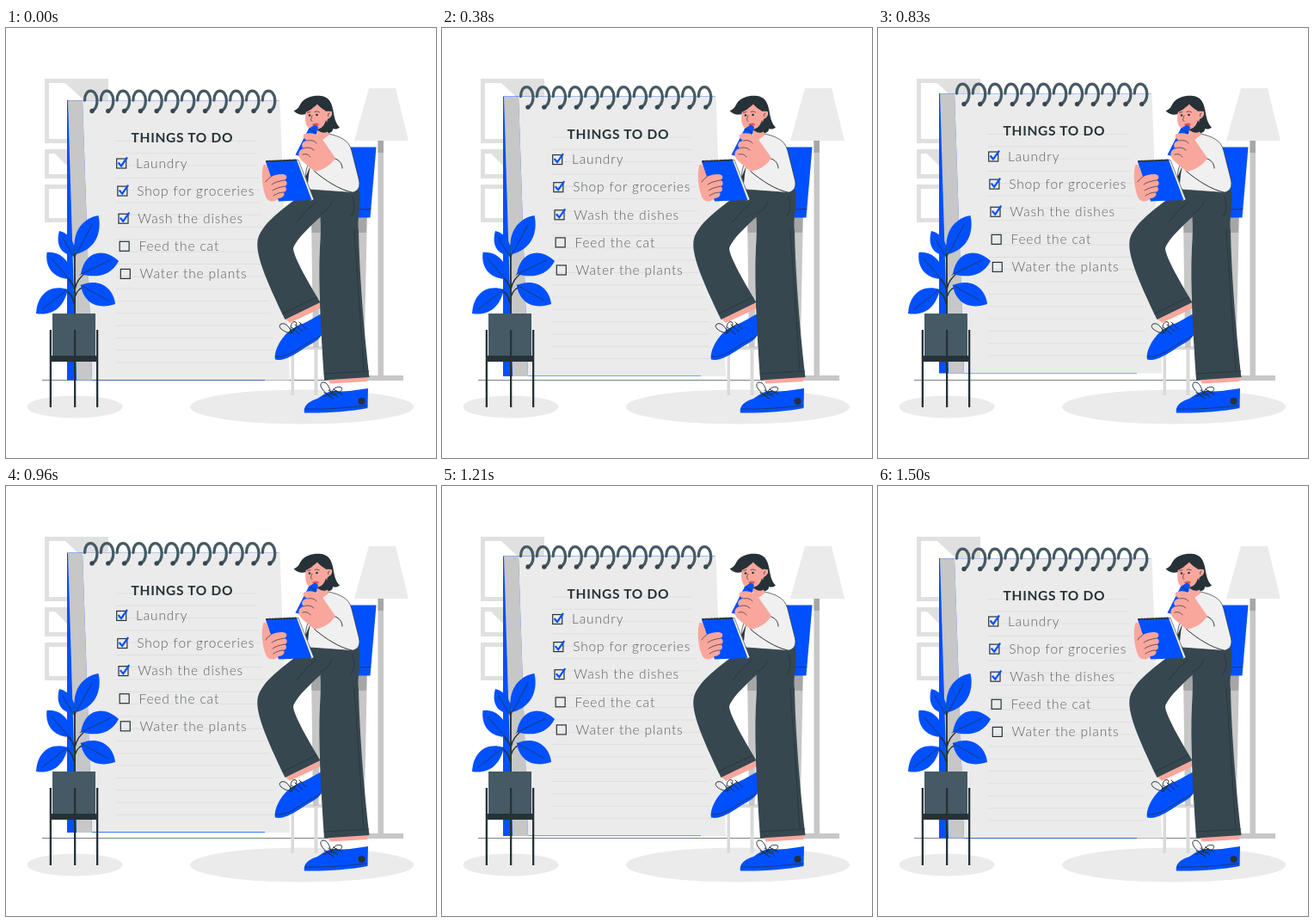
Write an HTML page that moves like this. It is 500 px wide and 500 px high and loops after 1.54 s.

```html
<!DOCTYPE html>
<html lang="en">
<head>
<meta charset="utf-8">
<title>Things to do</title>
<style>
  html, body { margin: 0; width: 100%; height: 100%; overflow: hidden; background: #fff; }
  svg { display: block; width: 100%; height: 100%; }
  .blue { fill: #0050ff; }
  .dark { fill: #263238; }
  .pants { fill: #37474f; }
  .skin { fill: #f9a79d; }
  .ink { fill: none; stroke: #263238; stroke-width: 1; stroke-linecap: round; stroke-linejoin: round; }
  .thin { stroke-width: .7; }
  .stem { stroke-width: 1.5; }
  .pale { fill: #e0e0e0; }
  .grey { fill: #c7c7c7; }
  .deep { fill: #a6a6a6; }
  .shade { fill: #ebebeb; }
  .floor { stroke: #6b7378; stroke-width: .9; }
  .rule { stroke: #dcdcdc; stroke-width: .8; }
  .ring { fill: none; stroke: #455a64; stroke-width: 3.3; stroke-linecap: round; }
  .box { fill: none; stroke: #263238; stroke-width: 1.2; }
  .tick { fill: none; stroke: #0050ff; stroke-width: 2.2; }
  text { font-family: Lato, "Open Sans", sans-serif; font-size: 15.5px; }
  .title { font-weight: 700; letter-spacing: .7px; fill: #263238; }
  .item { font-weight: 300; letter-spacing: .87px; fill: #5c6064; }
  #pad { animation: bob 1540ms cubic-bezier(.37, 0, .63, 1) infinite; }
  @keyframes bob {
    0% { transform: translateY(0); }
    47.5% { transform: translateY(-8.3px); }
    97%, 100% { transform: translateY(0); }
  }
</style>
</head>
<body>
<svg viewBox="0 0 500 500">
  <!-- wall frames -->
  <g class="pale">
    <path fill-rule="evenodd" d="M45 59H119V134H45ZM50 64V129H114V64Z"/>
    <path d="M69 64H114V106Z"/>
    <path fill-rule="evenodd" d="M45 141H119V175H45ZM50 146V170H114V146Z"/>
    <path d="M57 146H114V170H81Z"/>
    <path fill-rule="evenodd" d="M45 182H119V226H45ZM50 187V221H114V187Z"/>
  </g>

  <!-- floor and lamp -->
  <ellipse class="shade" cx="80" cy="440.500" rx="55.500" ry="13"/>
  <ellipse class="shade" cx="344" cy="440.500" rx="130" ry="20"/>
  <path class="floor" d="M42 409.500H440"/>
  <path class="grey" d="M432.500 131H439V404H462V410H394V404H432.500Z"/>
  <path class="deep" d="M432.500 131H439V145H432.500Z"/>
  <path class="shade" d="M422 70H453L468 131H405Z"/>

  <g id="pad">
    <path class="blue" d="M71 84H318L301 409.500H71Z"/>
    <path class="grey" d="M72 84.300H89L100 409.500H82Z"/>
    <path class="shade" d="M89 84.200H318.500L330 409.500H301V408.900H100Z"/>
    <g id="rules"></g>
    <g id="rings"></g>
    <text class="title" x="145.500" y="133.300">THINGS TO DO</text>
    <g id="items"></g>
  </g>

  <!-- stool -->
  <g>
    <path fill="#d9d9d9" d="M331.500 370H367V374H335V427H331.500Z"/>
    <path class="grey" d="M355 215H366L363.500 372H357Z"/>
    <path fill="#d9d9d9" d="M358.500 372H362.500V427H358.500Z"/>
    <path class="grey" d="M409 215H420L416 406H411Z"/>
    <path class="deep" d="M355 220H365.500V238H355.500ZM409 220H419.500L419 238H409Z"/>
    <path class="blue" d="M390 138.500H430.500L423.500 220.500H400Z"/>
    <path class="ink thin" d="M406 211L424 210.500"/>
  </g>

  <!-- plant -->
  <path class="ink stem" d="M80 334C81 310 79 280 80 252M79 320C78 312 75 308 69 305M80 309C80 301 78 298 73 292M80 304C82 295 85 291 92 285M80 313C82 306 87 301 94 300"/>
  <g class="blue">
    <path d="M81 263C75 240 88 221 107.500 218C112 239 103 258 81 263Z"/>
    <path d="M79 265C62 263 58 250 62 236C75 239 82 252 79 265Z"/>
    <path d="M75 292C58 292 45 281 47.500 261C65 259 78 275 75 292Z"/>
    <path d="M87 286C91 260 113 254 131 271C122 289 103 291 87 286Z"/>
    <path d="M72 304C49 297 36 312 35 332C53 335 67 326 72 304Z"/>
    <path d="M87 299C108 290 125 302 127 321C107 328 90 320 87 299Z"/>
  </g>
  <path class="ink thin" d="M80 266L100 229M80 268L66 244M76 295L53 268M86 287L121 270M72 304L42 327M87 299L119 317"/>
  <path class="ink stem" d="M80 332V262"/>
  <path fill="#455a64" d="M54 332H104V382H54Z"/>
  <path class="dark" d="M51 381H107V388H51ZM50.700 351H53V441H50.700ZM79 351H81.300V441H79ZM105 351H107.300V441H105Z"/>

  <!-- bent leg -->
  <g>
    <path class="skin" d="M324 337L364 318L367 325.500L330 343Z"/>
    <path class="blue" d="M367 332C356 338 346 344 334 349C321 357 311 375 313 385.500C323 388 335 380 345 373.500C356 366 367 363 368 352Z"/>
    <path class="ink thin" d="M314 382C325 383 336 376 346 369C354 364 361 361 367 357"/>
    <path class="ink" d="M331 355C321 353 315 347 320 344C326 342 331 350 332 355C329 346 333 340 337 342C340 345 335 352 332 355M332 348L341 356M336 345L345 353M341 342L349 350M331 353L343 344"/>
    <path class="pants" d="M352 187C330 205 299 224 293 245C289 262 302 292 324.500 339L365.500 319C354 300 334 266 334 256C338 245 354 230 372 214L386 188Z"/>
    <path class="ink thin" d="M322 332L361 313M365 199C353 207 345 217 338 226"/>
  </g>

  <!-- standing leg -->
  <g>
    <path class="skin" d="M373 406H421.500L420 411L377 413.500Z"/>
    <path class="blue" d="M421 419L420.500 442C400 446 370 448 347 447.500C345 440 352 434 362 431C370 426 376 421 385 422C398 424 410 420 421 419Z"/>
    <circle class="dark" cx="413.500" cy="434" r="4"/>
    <path class="ink thin" d="M348 443C372 444 398 441 420 439"/>
    <path class="ink" d="M377 428C367 422 363 414 368 412C374 411 377 420 378 426C379 419 386 416 390 418C393 422 384 426 378 427M370 424L381 431M375 421L386 429M381 420L391 426M369 429L384 422"/>
    <path class="pants" d="M356 187L411 189C413 212 408 220 410 236C411 290 417 360 422.500 406L370 409.500C366 350 363 300 365 255C366 238 366 226 365 212Z"/>
    <path class="ink thin" d="M370 402L422 399M366 216C372 213 376 209 379 202M403 196C406 207 405 214 401 219M405 235L416 398"/>
  </g>

  <!-- shirt -->
  <path fill="#f0f0f0" stroke="#263238" stroke-width=".7" d="M375 123C388 126 399 130 402 143L410.500 177C413 188 406 193 396 191L354 188C347 181 347 167 352 157L364 130Z"/>
  <path class="dark" d="M354 160L348.500 173L351 181L352 170Z"/>
  <path class="ink" d="M358 166C372 178 388 188 402 191M380 151C388 153 391 158 391 163"/>

  <!-- notebook -->
  <path fill="#f5f5f5" stroke="#263238" stroke-width=".6" d="M337 153.500H340L358 199.500L354 201Z"/>
  <path class="blue" d="M302 155.500L338 153.500L355.500 200L317 201.500Z"/>
  <path class="ink" stroke-dasharray="1.500 1.800" style="stroke-width:2" d="M303 155L337 153.500"/>
  <path class="skin" d="M299.500 159C304 157 305 166 308 173C314 170.500 323 168.500 326 172C327 175 325 176 324 177C328 179 327 183 324.500 184C327 187 326 190 323 191C325 195 321 198 317 198C311 204 304 202 302 196C298 186 296 169 299.500 159Z"/>
  <path class="ink thin" d="M308 173C305 175 303 177 302 179M324 177C318 178 313 179 309 182M324.500 184C319 185 314 186 310 189M323 191C318 191 314 193 311 195"/>

  <!-- head -->
  <path class="dark" d="M334.500 96C340 95 341 90 344 86C350 78 369 76 375 83C383 92 379 107 388 115.500C385 118 382 118 380 117C381 122 371 125 364 121L351 99C346 102 338 101 334.500 96Z"/>
  <path class="skin" d="M350 92C347 103 347.500 113 352 116L361 118L363 134L376 124C372 119 372 113 374 106C380 104 381 96 376 96L372 97L363 87C360 92 354 94 350 92Z"/>
  <path class="dark" d="M346 98C351 98 359 93 361 87C365 93 371 97 378 97L375 84L354 82Z"/>
  <path class="dark" d="M372 107C370 114 367 117 361 118L366 121C371 123 375 121 376 117Z"/>
  <circle class="dark" cx="353" cy="101.500" r="1.300"/>
  <circle class="dark" cx="361.500" cy="101" r="1.300"/>
  <path class="ink thin" d="M350.500 98.500L354 97.500M359 97.500C361 96.500 363 97 364.500 98M356 102C354 106 354 108 356 108.500M376 99C374 100 374 102 375 103"/>
  <path fill="#e2574c" d="M356 112C359 110 362 110 364 112C362 115 358 115 356 112Z"/>

  <!-- pen and writing hand -->
  <path class="blue" d="M352 117L359 112.500L363 115L361 123L344 149.500L336.500 147.500Z"/>
  <path class="ink thin" d="M352 117L361 122"/>
  <path class="skin" d="M347 123.500C355 120 365 124 369 131L383 151C378 160 368 165 359 167C352 160 345 157 341 150C339 145 342 141 346 140C342 136 345 131 351 131C346 129 344 125 347 123.500Z"/>
  <path class="ink thin" d="M351 131C355 130 359 131 361 134M346 140C350 138 355 139 358 142M345 147C349 146 352 147 354 150"/>
</svg>
<script>
  const fill = (id, n, draw) => {
    document.getElementById(id).innerHTML = Array.from({ length: n }, (_, i) => draw(i)).join('');
  };

  fill('rules', 19, i => {
    const y = 131.5 + i * 14.3;
    return `<path class="rule" d="M128 ${y}H${290 + i * 1.3}"/>`;
  });

  fill('rings', 12, i => `<g transform="translate(${i * 18.8} 0)">
    <path class="ring" d="M91.500 84C91.500 69.500 105 69.500 106 84C106 91 103.500 95 100 96.500"/>
    <circle class="pants" cx="100" cy="96.500" r="2.700"/></g>`);

  const tasks = ['Laundry', 'Shop for groceries', 'Wash the dishes', 'Feed the cat', 'Water the plants'];
  fill('items', tasks.length, i => `<g transform="translate(${i * 1.15} ${i * 32.1})">
    <rect class="box" x="128.700" y="152" width="11" height="11"/>
    ${i < 3 ? '<path class="tick" d="M130.500 156.500L134 160.500L141 150.500"/>' : ''}
    <text class="item" x="151" y="162.800">${tasks[i]}</text></g>`);
</script>
</body>
</html>
```
